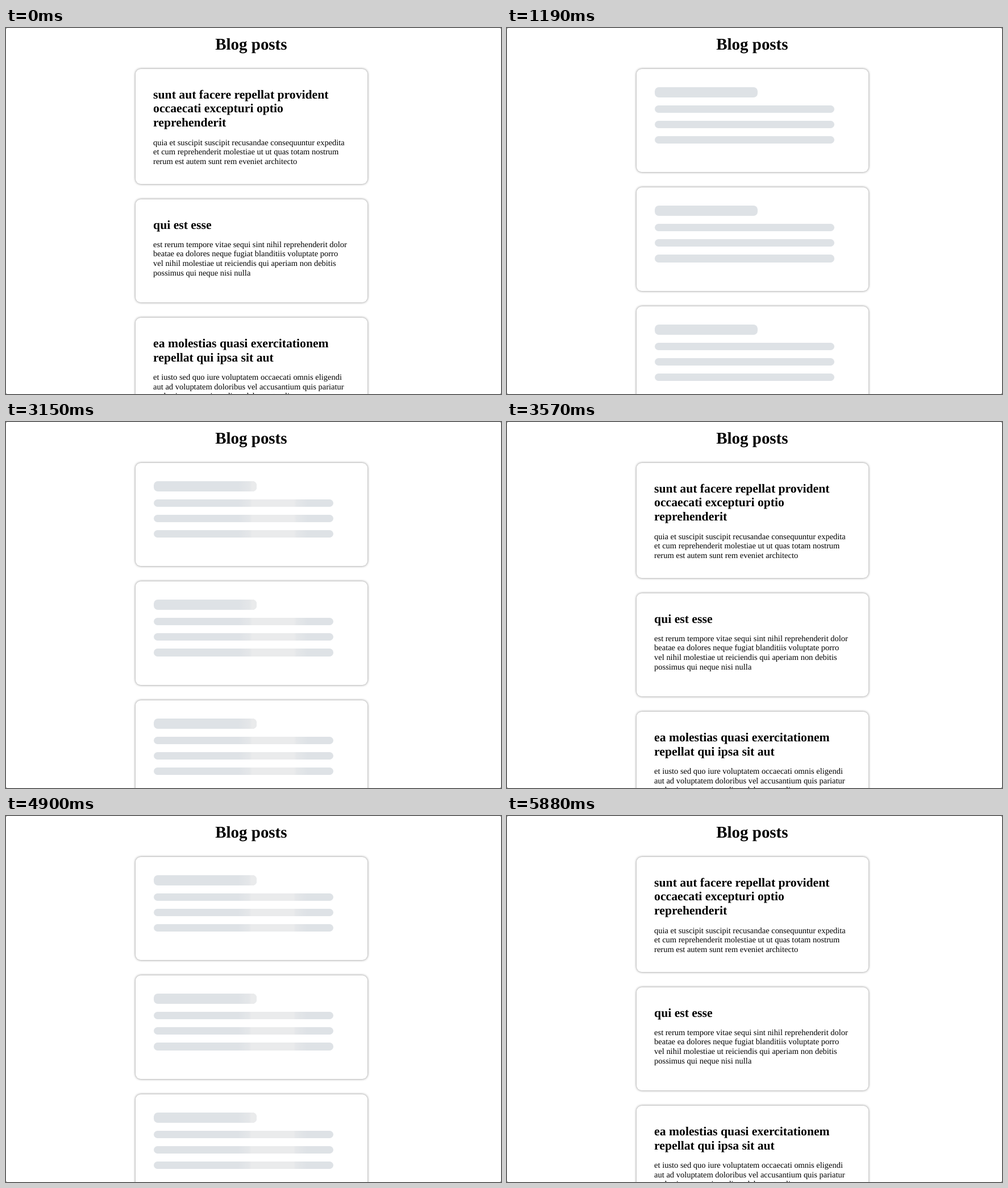
These frames come from a looping animation (871 by 643 pixels, 6.37 s). An HTML page:

```html
<!DOCTYPE html>
<html lang="la">
<head>
<meta charset="utf-8">
<title>Blog posts</title>
<style>
@property --x { syntax: "<length>"; inherits: true; initial-value: -205px; }

html, body { margin: 0; width: 100%; height: 100%; overflow: hidden; background: #555; }

.stage {
  position: relative; width: 871px; height: 643px; overflow: hidden;
  background: #fff; border-radius: 2px;
}
.layer { position: absolute; inset: 0; animation: 6370ms step-end infinite paused; }
.posts { animation-name: posts; }
.skeleton { animation-name: skeleton, sweep; }

.card {
  position: absolute; left: 227.5px; width: 408px; height: 181.5px; top: var(--y);
  border-radius: 9px; background: #fff; box-shadow: 0 0 4.5px gray;
}
.tall { height: 202.2px; }

.card i {
  position: absolute; left: 32px; top: 64px; width: 316.5px; height: 13.3px;
  border-radius: 6.65px; background: #dee2e6; overflow: hidden;
}
.card i:nth-child(1) { top: 32.2px; width: 181px; height: 18px; border-radius: 7.2px; }
.card i:nth-child(3) { top: 91.1px; }
.card i:nth-child(4) { top: 118.3px; }

/* Light band: solid core with a soft edge on both sides */
.card i::after {
  content: ""; position: absolute; left: -52px; top: 0; width: 122px; height: 100%;
  transform: translateX(var(--x));
  background: linear-gradient(90deg, #eaebec00, #eaebec88 20px, #eaebec 24px,
    #eaebec 98px, #eaebec88 102px, #eaebec00);
}

svg { position: absolute; left: 0; top: 0; }
text {
  font: 14.47px "Liberation Serif", "Times New Roman", serif;
  text-rendering: geometricPrecision; fill: #000;
}
.h1 { font-size: 28.94px; font-weight: bold; text-anchor: middle; }
.h2 { font-size: 21.7px; font-weight: bold; }

@keyframes posts {
  0%, 51.64%, 87.91% { opacity: 1; }
  18.68%, 62.63% { opacity: 0; }
  100% { opacity: 1; }
}
@keyframes skeleton {
  0%, 51.64%, 87.91% { opacity: 0; }
  18.68%, 62.63% { opacity: 1; }
  100% { opacity: 0; }
}
@keyframes sweep {
  0%, 49.765%, 78.022% { --x: -205px; animation-timing-function: step-end; }
  18.68%, 34.06%, 62.63%, 78.493% { --x: -205px; animation-timing-function: ease; }
  34.055%, 49.76%, 78.017%, 94.192% { --x: 201px; animation-timing-function: step-end; }
  100% { --x: -205px; }
}
</style>
</head>
<body>
<div class="stage">
  <div class="layer posts">
    <div class="card tall" style="--y: 71.7px"></div>
    <div class="card" style="--y: 300.9px"></div>
    <div class="card tall" style="--y: 509.3px"></div>
    <svg width="871" height="643">
      <text class="h2" x="259.1" y="123.5">sunt aut facere repellat provident</text>
      <text class="h2" x="259.1" y="148.4">occaecati excepturi optio</text>
      <text class="h2" x="259.1" y="173.4">reprehenderit</text>
      <text x="259.1" y="205.6">quia et suscipit suscipit recusandae consequuntur expedita</text>
      <text x="259.1" y="222.2">et cum reprehenderit molestiae ut ut quas totam nostrum</text>
      <text x="259.1" y="238.9">rerum est autem sunt rem eveniet architecto</text>

      <text class="h2" x="259.1" y="352.6">qui est esse</text>
      <text x="259.1" y="384.8">est rerum tempore vitae sequi sint nihil reprehenderit dolor</text>
      <text x="259.1" y="401.4">beatae ea dolores neque fugiat blanditiis voluptate porro</text>
      <text x="259.1" y="418.1">vel nihil molestiae ut reiciendis qui aperiam non debitis</text>
      <text x="259.1" y="434.7">possimus qui neque nisi nulla</text>

      <text class="h2" x="259.1" y="560.9">ea molestias quasi exercitationem</text>
      <text class="h2" x="259.1" y="585.8">repellat qui ipsa sit aut</text>
      <text x="259.1" y="618">et iusto sed quo iure voluptatem occaecati omnis eligendi</text>
      <text x="259.1" y="634.6">aut ad voluptatem doloribus vel accusantium quis pariatur</text>
      <text x="259.1" y="651.3">molestiae porro eius odio et labore et velit aut</text>
    </svg>
  </div>
  <div class="layer skeleton">
    <div class="card" style="--y: 71.7px"><i></i><i></i><i></i><i></i></div>
    <div class="card" style="--y: 280.1px"><i></i><i></i><i></i><i></i></div>
    <div class="card" style="--y: 488.5px"><i></i><i></i><i></i><i></i></div>
  </div>
  <svg width="871" height="643">
    <text class="h1" x="431.4" y="37.7">Blog posts</text>
  </svg>
</div>
<script>
// The picture advances in 70 ms ticks.
const LOOP = 6370, TICK = 70;
const clips = document.getAnimations();
const start = performance.now();

function draw() {
  const time = (performance.now() - start) % LOOP;
  const tick = Math.floor(time / TICK) * TICK;
  for (const clip of clips) clip.currentTime = tick;
  requestAnimationFrame(draw);
}
draw();
</script>
</body>
</html>
```
